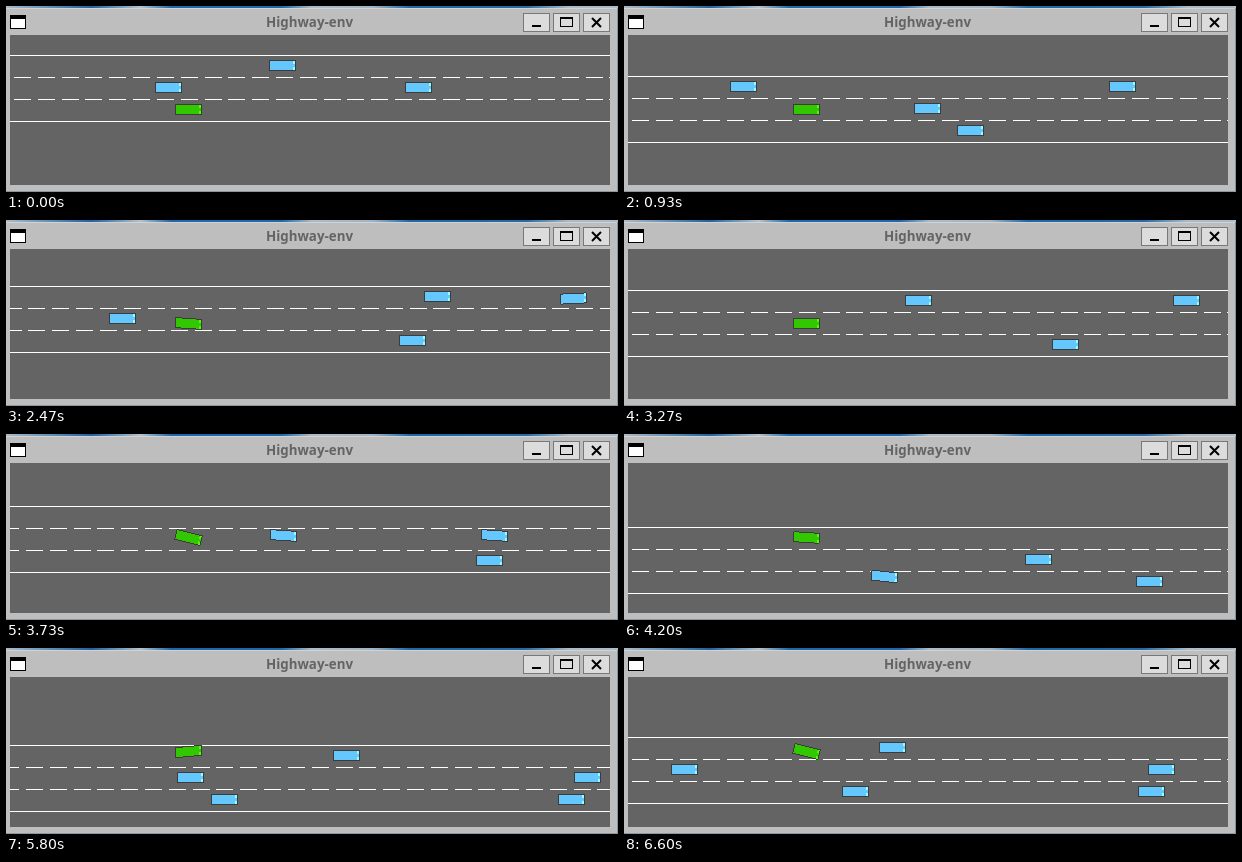
Write an HTML page that moves like this. It is 612 px wide and 186 px high and loops after 6.67 s.

```html
<!DOCTYPE html>
<html lang="en">
<head>
<meta charset="utf-8">
<title>Highway-env</title>
<style>
  html, body { margin: 0; width: 100%; height: 100%; overflow: hidden; background: #bebebe; }
  svg { display: block; width: 612px; height: 186px; }
  .title { font: bold 13.33px "Noto Sans", "Open Sans", sans-serif; fill: #646464; text-anchor: middle; }
</style>
</head>
<body>
<svg viewBox="0 0 612 186" shape-rendering="crispEdges">
  <defs>
    <linearGradient id="desk">
      <stop offset="0" stop-color="#a9bccb"/>
      <stop offset=".14" stop-color="#1f639f"/>
      <stop offset=".22" stop-color="#b4c3ce"/>
      <stop offset=".27" stop-color="#1d68a8"/>
      <stop offset=".45" stop-color="#1d68a8"/>
      <stop offset=".5" stop-color="#a9bccb"/>
      <stop offset=".6" stop-color="#9fb4c4"/>
      <stop offset=".66" stop-color="#1d68a8"/>
      <stop offset=".85" stop-color="#256ba5"/>
      <stop offset=".92" stop-color="#a9bccb"/>
    </linearGradient>
    <clipPath id="view"><rect x="4" y="29" width="600" height="150"/></clipPath>
    <rect id="button" x=".5" y=".5" width="26" height="18" fill="#dcdcdc" stroke="#787878"/>
  </defs>

  <rect width="612" height="186" fill="#bebebe"/>
  <rect width="612" height="2" fill="url(#desk)"/>
  <rect y="2" width="611" height="1" fill="#d2d2d2"/>
  <rect x="611" y="2" width="1" height="184" fill="#8295a5"/>
  <rect y="185" width="612" height="1" fill="#8b969f"/>

  <rect x="4" y="9" width="16" height="14" fill="#000"/>
  <rect x="5" y="13" width="14" height="9" fill="#fff"/>
  <text class="title" x="303.5" y="21">Highway-env</text>

  <use href="#button" x="517" y="7"/>
  <use href="#button" x="547" y="7"/>
  <use href="#button" x="577" y="7"/>
  <rect x="526" y="19" width="9" height="2" fill="#000"/>
  <path d="M554.5 12V20.5H566.5V12" fill="none" stroke="#000"/>
  <rect x="554" y="11" width="13" height="2" fill="#000"/>
  <path d="M586 12L595 21M595 12L586 21" stroke="#000" stroke-width="2" shape-rendering="auto"/>

  <g clip-path="url(#view)">
    <rect x="4" y="29" width="600" height="150" fill="#646464"/>
    <g id="road" stroke="#fff">
      <path d="M4 .5H604M4 66.5H604"/>
      <path id="dashes" d="M4 22.5H604M4 44.5H604" stroke-dasharray="17 6.815"/>
    </g>
    <g id="cars"></g>
  </g>
</svg>
<script>
const STEP = 1000 / 15, STEPS = 100;
const LANE = 22.1, TOP = 48.6, PERIOD = 23.815, DASH_START = 8;
const ENTER = 625, LEAVE = -20;

// Steps at which the green car turns one lane up or down.
const ups = [5, 22, 28, 42, 51, 56.5, 84];
const downs = [16, 34, 39, 54, 76, 98.7];

// Cars pass their key places at these steps, at even speed in between.
const marks = [0, 14, 26, 49, 63, 75, 99];
const traffic = [
  { from: 0, places: [276.5, 119.5], lane: 0 },
  { from: 0, places: [162.5], lane: 1 },
  { from: 0, places: [412.5, 303.5, 242.5], lane: 1 },
  { from: 1, places: [346.5, 373.5, 441.5, 525.5, 602.5, 527.5], lane: 2 },
  { from: 1, places: [498.5, 557.5, 294.5, 260.5, 204.5, 231.5], lane: 0, downs: [50, 58.6] },
  { from: 2, places: [571.5, 562.5, 414.5, 307.5, 60.5], lane: 1, ups: [30], downs: [50] },
  { from: 5, places: [412.5, 268.5], lane: 0 },
  { from: 6, places: [537.5], lane: 1 }
];

// Progress of a turn: swings past its lane, or eases in when swing is 0.
function settle(m, rate, swing) {
  return m > 0 ? 1 - Math.exp(-rate * m) * Math.cos(swing * m) : 0;
}

function sum(steps = [], n, rate, swing) {
  return steps.reduce((total, s) => total + settle(n - s, rate, swing), 0);
}

function roadTop(n) {
  return TOP + LANE * (sum(ups, n, .45, .8) - sum(downs, n, .45, .8));
}

function laneOffset(v, n) {
  return LANE * (v.lane + sum(v.downs, n, .33, 0) - sum(v.ups, n, .33, 0));
}

function heading(y, n) {
  const slope = (y(n) - y(n - .1)) / .1;
  return 14 * Math.tanh(.27 * slope);
}

// Step expressed in marks: 0 at the first, 1 at the second and so on.
function markTime(n) {
  const i = marks.findIndex(m => m >= n);
  return i > 0 ? i - (marks[i] - n) / (marks[i] - marks[i - 1]) : 0;
}

function carX(v, t) {
  const last = v.places.length;
  const place = i => i < 0 ? ENTER : i < last ? v.places[i] : LEAVE;
  const i = Math.floor(t - v.from), u = t - v.from - i;
  return place(i) + u * (place(i + 1) - place(i));
}

const road = document.getElementById("road");
const dashes = document.getElementById("dashes");
const cars = document.getElementById("cars");

function makeCar(fill, lamp) {
  const car = document.createElementNS("http://www.w3.org/2000/svg", "g");
  car.innerHTML =
    `<rect x="-13" y="-5" width="26" height="10" fill="${fill}" stroke="#3c3c3c"/>
     <path d="M10.5 -4.5h2v3h-2zM10.5 1.5h2v3h-2z" fill="${lamp}"/>`;
  cars.append(car);
  return car;
}

function place(car, x, y, angle) {
  car.setAttribute("transform", `translate(${x} ${y}) rotate(${angle})`);
}

for (const v of traffic) v.car = makeCar("#64c8ff", "#93ffff");
const ego = makeCar("#32c800", "#49ff00");

function draw(n) {
  const top = Math.round(roadTop(n)), t = markTime(n);
  road.setAttribute("transform", `translate(0 ${top})`);
  // Five stripes go by between marks.
  const start = DASH_START - 4 - 5 * PERIOD * t;
  dashes.setAttribute("stroke-dashoffset", -(start % PERIOD));

  for (const v of traffic) {
    const x = Math.floor(carX(v, t)) + .5;
    const offset = m => laneOffset(v, m);
    place(v.car, x, top + 10.5 + Math.round(offset(n)), heading(offset, n));
  }
  place(ego, 182.5, 103.5, heading(m => -roadTop(m), n));
}

let shown = -1;
function tick() {
  const n = Math.floor((performance.now() + 3.5) / STEP) % STEPS;
  if (n !== shown) draw(shown = n);
  requestAnimationFrame(tick);
}
tick();
</script>
</body>
</html>
```
